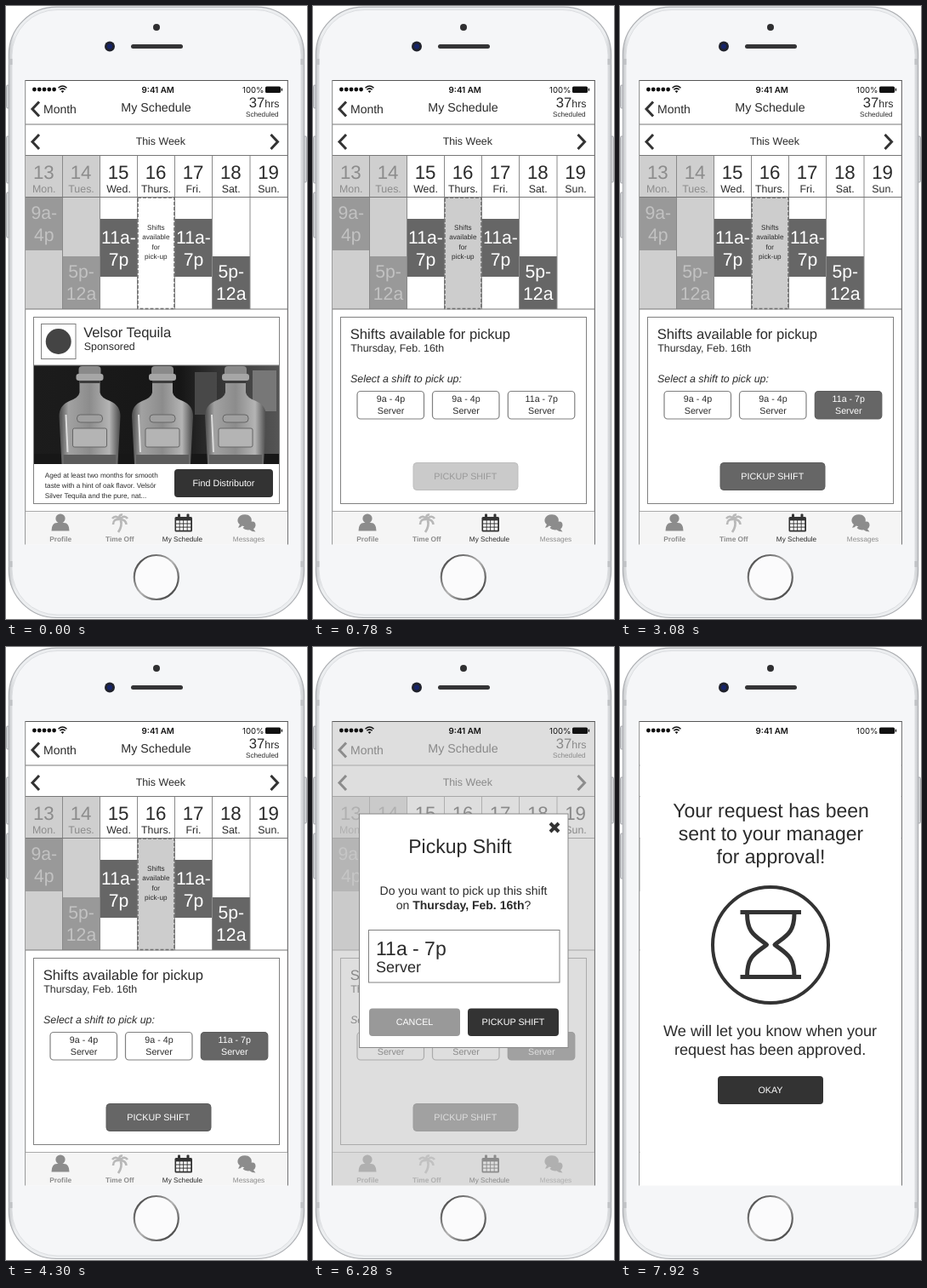
An HTML page for the animation above (8 s loop, 354x720 px).

```html
<!DOCTYPE html>
<html lang="en">
<head>
<meta charset="utf-8">
<title>Shift pickup</title>
<style>
html, body { margin: 0; width: 100%; height: 100%; overflow: hidden; background: #fff; }
svg { display: block; width: 100%; height: 100%; }
text { font-family: "Liberation Sans", Arial, sans-serif; text-rendering: geometricPrecision; white-space: pre; }
.status text { font-family: Inter, sans-serif; }
</style>
</head>
<body>
<svg id="stage" viewBox="0 0 354 720" xmlns="http://www.w3.org/2000/svg"></svg>
<script>
const LOOP = 8000;
const CELL_TAP = 740, SHIFT_LIST = 780, SHIFT_TAP = 2380, SHIFT_CHOSEN = 2480, CONFIRM = 4940, DONE = 7920;
const INK = '#2b2b2b', DARK = '#333', MID = '#666', LINE = '#808080', SOFT = '#8c8c8c';
const XS = 8.2, S = 10.75, M = 12.4, L = 16.6, XL = 23;

const rect = (x, y, w, h, fill, extra = '') =>
  `<rect x="${x}" y="${y}" width="${w}" height="${h}" fill="${fill}" ${extra}/>`;
const frame = (x, y, w, h, stroke = LINE, fill = '#fff', extra = '') =>
  rect(x, y, w, h, fill, `stroke="${stroke}" ${extra}`);
const line = (x1, y1, x2, y2, stroke = LINE, w = 1) =>
  `<path d="M${x1} ${y1}L${x2} ${y2}" stroke="${stroke}" stroke-width="${w}"/>`;
const curve = (d, w, stroke = DARK) =>
  `<path d="${d}" fill="none" stroke="${stroke}" stroke-width="${w}"/>`;
const shape = (d, fill) => `<path d="${d}" fill="${fill}"/>`;
const dot = (x, y, r, fill) => `<circle cx="${x}" cy="${y}" r="${r}" fill="${fill}"/>`;
const text = (s, x, y, size, fill = INK, extra = '') =>
  `<text x="${x}" y="${y}" font-size="${size}" fill="${fill}" ${extra}>${s}</text>`;
const mid = (s, x, y, size, fill = INK, extra = '') =>
  text(s, x, y, size, fill, `text-anchor="middle" ${extra}`);
const group = (id, body) => `<g id="${id}">${body}</g>`;
const button = (label, x, y, w, h, fill, ink = '#fff') =>
  rect(x, y, w, h, fill, 'rx="4"') + mid(label, x + w / 2, y + h / 2 + 3.6, S, ink);

const defs = `<defs>
  <linearGradient id="ring" x1="0" y1="0" x2="1" y2="1">
    <stop offset="0" stop-color="#333"/><stop offset=".35" stop-color="#8a8a8a"/>
    <stop offset=".5" stop-color="#b5b5b5"/><stop offset=".7" stop-color="#777"/>
    <stop offset="1" stop-color="#2c2c2c"/>
  </linearGradient>
  <linearGradient id="rim">
    <stop offset="0" stop-color="#c6c8cb"/><stop offset=".02" stop-color="#eceef0"/>
    <stop offset=".98" stop-color="#eceef0"/><stop offset="1" stop-color="#c6c8cb"/>
  </linearGradient>
  <linearGradient id="glass">
    <stop offset="0" stop-color="#4a4a4a"/><stop offset=".15" stop-color="#a2a2a2"/>
    <stop offset=".5" stop-color="#8c8c8c"/><stop offset=".82" stop-color="#b4b4b4"/>
    <stop offset="1" stop-color="#484848"/>
  </linearGradient>
  <linearGradient id="room">
    <stop offset="0" stop-color="#1c1c1c"/><stop offset=".6" stop-color="#161616"/>
    <stop offset=".75" stop-color="#333"/><stop offset="1" stop-color="#555"/>
  </linearGradient>
  <clipPath id="photo"><rect x="33" y="422" width="288" height="116"/></clipPath>
</defs>`;

function phone() {
  const key = (x, y, h) => rect(x, y, 4, h, '#d4d6d9', 'rx="1.5" stroke="#9c9ea2" stroke-width=".8"');
  const bands = [3.5, 346.5].map(x => [62, 652].map(y => rect(x, y, 4, 7, '#c0c2c5')).join('')).join('');
  return key(.5, 93, 27) + key(.5, 153, 55) + key(.5, 219, 53) + key(349.5, 153, 54) +
    frame(3.3, 1.2, 347.4, 717.3, '#adafb3', 'url(#rim)', 'rx="56" stroke-width="1.2"') +
    rect(7, 4.5, 340, 710.5, '#f5f6f8', 'rx="53" stroke="#dcdee1"') + bands +
    dot(177, 25, 4, '#2f2f31') + dot(122, 47.5, 6, '#20222c') + dot(122, 47.5, 3, '#16246a') +
    rect(147, 45, 61, 5, '#343436', 'rx="2.5"') +
    `<circle cx="176.8" cy="671" r="26" fill="#fbfbfc" stroke="url(#ring)" stroke-width="2.2"/>` +
    rect(23, 87, 308.5, 545.5, '#fff') +
    line(22.5, 87.5, 331.5, 87.5, '#555') + line(22.7, 87, 22.7, 632.5, '#888') + line(331.3, 87, 331.3, 632.5, '#555');
}

function status() {
  let s = '';
  for (let i = 0; i < 5; i++) s += dot(33.4 + i * 5.8, 98, 2.4, '#111');
  s += curve('M61.5 96.2Q66.5 91.8 71.5 96.2M63.3 98.3Q66.5 95.4 69.7 98.3', 1.5, '#111') +
    shape('M64.6 100L66.5 102L68.4 100Q66.5 98.5 64.6 100Z', '#111');
  s += mid('9:41 AM', 178.7, 101.6, 9.8, '#111', 'font-weight="600"') + text('100%', 278, 101.6, 9.6, '#111');
  return `<g class="status">${s}${rect(305, 94.5, 18, 7.5, '#111', 'rx="1.5"')}${rect(323.7, 96.7, 1.4, 3, '#111')}</g>`;
}

function header() {
  return curve('M39 112.5L31 121L39 129.5', 3) + text('Month', 44, 125.5, 14) +
    mid('My Schedule', 176.5, 124, 14.25) +
    text('37', 285.7, 118.5, L) + text('hrs', 304.3, 118.5, M) + mid('Scheduled', 301.3, 130, XS) +
    line(23, 139, 331, 139, '#777') + curve('M39 151L31 159.5L39 168', 3) +
    mid('This Week', 181.8, 162.8, M) + curve('M311.5 151L319.5 159.5L311.5 168', 3);
}

function week() {
  const edges = [23, 66.5, 110.5, 154.5, 198.5, 242.5, 287, 331];
  const days = ['Mon.', 'Tues.', 'Wed.', 'Thurs.', 'Fri.', 'Sat.', 'Sun.'];
  const shifts = [[0, 225, 62, '9a-', '4p'], [1, 294, 62, '5p-', '12a'], [2, 250, 68, '11a-', '7p'],
    [4, 250, 68, '11a-', '7p'], [5, 294, 62, '5p-', '12a']];
  const center = i => (edges[i] + edges[i + 1]) / 2;
  let s = rect(23, 176, 87.5, 180, '#cfcfcf');
  for (const [i, y, h, from, to] of shifts) {
    const past = i < 2, base = y + (h > 62 ? 29 : 24.8), ink = past ? '#c2c2c2' : '#fff';
    s += rect(edges[i], y, edges[i + 1] - edges[i], h, past ? '#999' : MID) +
      mid(from, center(i), base, 21.2, ink) + mid(to, center(i), base + 25.7, 21.2, ink);
  }
  days.forEach((day, i) => {
    const ink = i < 2 ? SOFT : INK;
    s += mid(13 + i, center(i) - .4, 203.3, 22.3, ink) + mid(day, center(i), 219.4, M, ink);
  });
  s += edges.slice(1, -1).map(x => line(x, 176, x, 356, '#8a8a8a')).join('');
  s += [175.5, 224.5, 356].map(y => line(23, y, 331, y, '#777')).join('');
  s += `<rect id="open" x="155" y="225" width="43" height="130.5" stroke="#707070" stroke-width="1.6" stroke-dasharray="4 2"/>`;
  return s + ['Shifts', 'available', 'for', 'pick-up'].map((w, i) => mid(w, 176.3, 262.7 + i * 11.4, XS)).join('');
}

function bottle(x) {
  return `<g transform="translate(${x} 422)">` +
    shape('M-12 14H12V32Q13 38 24 42Q36 47 36 60L33 116H-33L-36 60Q-36 47-24 42Q-13 38-12 32Z', 'url(#glass)') +
    rect(-13, 1, 26, 13, '#8a8a8a', 'rx="4"') + rect(-16, 10, 32, 8, '#a6a6a6', 'rx="3"') +
    rect(-12, 18, 24, 3, '#3c3c3c') + rect(-15, 58, 30, 9, '#a0a0a0', 'rx="4" stroke="#666"') +
    rect(-20, 74, 40, 22, '#b4b4b4', 'rx="2" stroke="#666"') +
    rect(-31, 105, 62, 11, '#5c5c5c') + line(-28, 58, -26, 102, '#ddd', 2) + '</g>';
}

function advert() {
  const copy = ['Aged at least two months for smooth', 'taste with a hint of oak flavor. Velsór', 'Silver Tequila and the pure, nat...'];
  return frame(41.5, 373.5, 40.5, 41) + dot(61.7, 394, 15, '#444') +
    text('Velsor Tequila', 91.2, 389.3, L) + text('Sponsored', 91.8, 404, M) +
    `<g clip-path="url(#photo)">${rect(33, 422, 288, 116, 'url(#room)')}` +
    rect(222, 430, 26, 50, '#484848') + rect(290, 428, 28, 48, '#777') + rect(33, 526, 288, 12, '#171717') +
    [98.5, 184, 270].map(bottle).join('') + '</g>' + line(33, 422, 321, 422) +
    copy.map((s, i) => text(s, 45.8, 554.3 + i * 11.8, XS)).join('') +
    button('Find Distributor', 198, 544, 116, 33, DARK);
}

function shiftList() {
  const slot = (x, hours) => frame(x, 452.5, 78.5, 32.5, '#808080', '#fff', 'rx="4" stroke-width="1.2" class="slot"') +
    `<g class="label" fill="${INK}">` +
    [hours, 'Server'].map((s, i) => `<text x="${x + 39.5}" y="${465.3 + i * 13.4}" font-size="10.7" text-anchor="middle">${s}</text>`).join('') + '</g>';
  return text('Shifts available for pickup', 43.8, 391, L) + text('Thursday, Feb. 16th', 44.2, 405.5, M) +
    text('Select a shift to pick up:', 44, 441.5, M, INK, 'font-style="italic"') +
    slot(52, '9a - 4p') + slot(140.5, '9a - 4p') +
    rect(227, 450, 83, 37, '#b9b9b9', 'id="halo" rx="3"') + `<g id="choice">${slot(229.3, '11a - 7p')}</g>` +
    frame(118, 536.5, 123, 32, '#bdbdbd', '#cacaca', 'id="pickup" rx="4"') +
    mid('PICKUP SHIFT', 179.3, 556.3, S, '#999', 'id="pickupLabel"');
}

function tabs() {
  let cal = rect(198.5, 600, 20.5, 17.5, DARK, 'rx="1.5"') + rect(202, 596.5, 3, 6, DARK, 'rx="1"') + rect(212.5, 596.5, 3, 6, DARK, 'rx="1"');
  for (let i = 0; i < 12; i++) cal += rect(200.1 + i % 4 * 4.5, 604.4 + (i >> 2) * 4.1, 3.6, 3.1, '#fff');
  return rect(23.5, 593, 307.3, 39.5, '#f5f5f5') + line(23, 593.5, 331, 593.5, '#aaa') +
    dot(64, 602, 5.6, SOFT) + shape('M53.5 616.5Q53.5 607 60 607H68Q74.5 607 74.5 616.5Z', SOFT) +
    curve('M135 604Q137 611 132 618', 2.8, '#b8b8b8') +
    curve('M134 603Q129 597 125 602M134 603Q126 602 126 609M134 603Q132 597 137 597.5M134 603Q139 597 143 602M134 603Q141 603 141.5 609', 2.6, '#b8b8b8') +
    cal + shape('M284 607Q294 603 293.5 610.5Q293 613 291 614.2L293.5 617.5Q289 617.5 286.5 615.3Q281 616 278.5 613Z', SOFT) +
    shape('M281 597.2C291.5 597.2 291.5 611 281 611Q279 611 277.8 610.5Q276 612.7 273 612.7L275 609C270 605.5 272.5 597.2 281 597.2Z', SOFT) +
    mid('Profile', 64.2, 629, 8.3, SOFT, 'font-weight="bold"') + mid('Time Off', 133.8, 629, 8.3, SOFT, 'font-weight="bold"') +
    mid('My Schedule', 207.5, 629, XS) + mid('Messages', 285.5, 629, XS, SOFT);
}

function dialog() {
  return rect(23, 88, 308, 544.5, '#c8c8c8', 'opacity=".6"') + frame(54.5, 196, 245.5, 274.5, '#888') +
    curve('M279 207L289 217M289 207L279 217', 4) + mid('Pickup Shift', 173, 242, XL) +
    mid('Do you want to pick up this shift', 177, 291, 14) +
    mid('on <tspan font-weight="bold">Thursday, Feb. 16th</tspan>?', 177, 308, 14) +
    frame(65.5, 332.5, 224.5, 61.5) + text('11a - 7p', 74, 362, XL) + text('Server', 74, 382, 18) +
    button('CANCEL', 66, 424.5, 107, 32.5, '#999') + button('PICKUP SHIFT', 182, 424.5, 107, 32.5, DARK);
}

function sent() {
  const glass = 'M149.5 313C149.5 336 159 339 172.5 349.7C159 360 149.5 363 149.5 387';
  return rect(23.5, 88, 307.2, 544.5, '#fff') +
    ['Your request has been', 'sent to your manager', 'for approval!'].map((s, i) => mid(s, 177.5, 200 + i * 27, XL)).join('') +
    `<circle cx="177" cy="350" r="68" fill="none" stroke="${DARK}" stroke-width="4"/>` +
    line(141.5, 311.5, 213, 311.5, DARK, 5) + line(141.5, 387.5, 213, 387.5, DARK, 5) +
    `<g stroke-linejoin="round">${curve(glass, 5)}<g transform="translate(354.5 0) scale(-1 1)">${curve(glass, 5)}</g></g>` +
    ['We will let you know when your', 'request has been approved.'].map((s, i) => mid(s, 176.6, 457 + i * 22, 18.1)).join('') +
    button('OKAY', 115, 504, 124, 33, DARK);
}

const stage = document.getElementById('stage');
stage.innerHTML = defs + phone() + header() + week() + frame(32.5, 365.5, 289, 219) +
  group('advert', advert()) + group('list', shiftList()) + tabs() +
  group('dialog', dialog()) + group('sent', sent()) + status();

const $ = id => document.getElementById(id);
const show = (id, on) => $(id).setAttribute('display', on ? 'inline' : 'none');
const paint = (el, fill, stroke) => {
  el.setAttribute('fill', fill);
  if (stroke) el.setAttribute('stroke', stroke);
};

function draw(t) {
  const tapped = t >= SHIFT_TAP && t < SHIFT_CHOSEN, chosen = t >= SHIFT_CHOSEN;
  show('advert', t < SHIFT_LIST);
  show('list', t >= SHIFT_LIST);
  show('halo', tapped);
  show('dialog', t >= CONFIRM && t < DONE);
  show('sent', t >= DONE);
  paint($('open'), t < CELL_TAP ? '#fff' : '#cdcdcd');
  paint($('choice').querySelector('.slot'), chosen ? MID : tapped ? '#b9b9b9' : '#fff', chosen ? '#5c5c5c' : '#808080');
  paint($('choice').querySelector('.label'), chosen ? '#fff' : INK);
  paint($('pickup'), chosen ? MID : '#cacaca', chosen ? '#5c5c5c' : '#bdbdbd');
  paint($('pickupLabel'), chosen ? '#fff' : '#999');
}

const start = performance.now();
function tick() {
  draw((performance.now() - start) % LOOP);
  requestAnimationFrame(tick);
}
tick();
</script>
</body>
</html>
```
